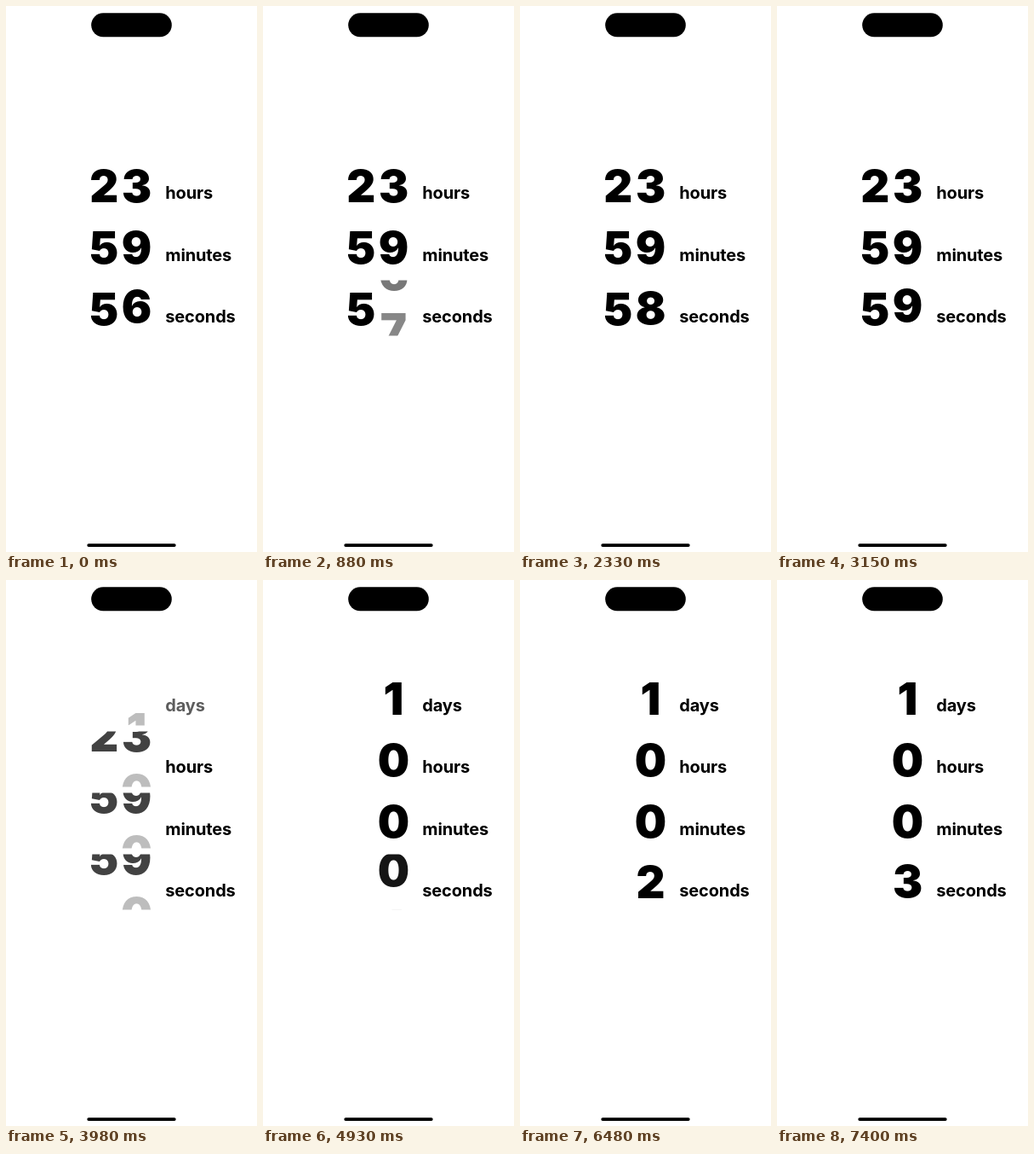
Recreate the animation shown at these times as an HTML page. Size 295x640 px, loop 7.48 s.

```html
<!DOCTYPE html>
<html lang="en">
<head>
<meta charset="utf-8">
<title>Countdown</title>
<style>
  html, body { margin: 0; width: 100%; height: 100%; overflow: hidden; background: #fff; }
  svg { display: block; width: 295px; height: 640px; }
  text { font-family: Inter, Roboto, sans-serif; fill: #000; }
  .digit { font-size: 52.6px; font-weight: 900; text-anchor: middle; }
  .label { font-size: 20px; font-weight: 700; letter-spacing: -0.15px; }
</style>
</head>
<body>
<svg id="stage" viewBox="0 0 295 640">
  <rect width="295" height="640" fill="#fff"/>
  <rect x="100.2" y="8.3" width="94.6" height="28" rx="14"/>
  <rect x="95.3" y="630.2" width="104.4" height="3.8" rx="1.9"/>
</svg>
<script>
const LOOP = 7480;
const ROW = 72, SLIDE = 65;
const TICKS = [-335, 710, 1675, 2775, 3853, 4850, 5838, 6835];
const ROLLOVER = 4; // index of the tick where a full day is reached
const FIRST = 86395; // seconds on the clock before the first tick
const NAMES = ["days", "hours", "minutes", "seconds"];

const stage = document.getElementById("stage");

function add(parent, tag, attrs, text) {
  const el = document.createElementNS("http://www.w3.org/2000/svg", tag);
  for (const key in attrs) el.setAttribute(key, attrs[key]);
  if (text) el.textContent = text;
  parent.appendChild(el);
  return el;
}

// Each row holds a leaving and an entering pair of digits inside a clip box.
const rows = NAMES.map((name, i) => {
  const clip = add(stage, "clipPath", { id: "clip-" + name });
  add(clip, "rect", { x: 90, y: 105.5 + i * ROW, width: 90, height: SLIDE });
  const box = add(stage, "g", { "clip-path": `url(#clip-${name})` });
  const digit = x => add(box, "text", { class: "digit", x, y: 157.6 + i * ROW });
  const pair = () => [digit(115.3), digit(153.5)];
  const label = add(stage, "text", { class: "label", x: 187.3, y: 153.8 + i * 72.5 }, name);
  return { old: pair(), now: pair(), label };
});

// Step response of an underdamped spring
function spring(ms) {
  const t = Math.max(0, ms) / 1000, w = 10, z = 0.66;
  const r = Math.sqrt(1 - z * z), a = w * r * t;
  return 1 - Math.exp(-z * w * t) * (Math.cos(a) + z / r * Math.sin(a));
}

const clamp = v => Math.min(1, Math.max(0, v));

function digits(total) {
  const parts = [Math.floor(total / 86400), Math.floor(total / 3600) % 24,
                 Math.floor(total / 60) % 60, total % 60];
  return parts.map((n, i) => {
    if (i === 0 && n === 0) return ["", ""];
    return [n > 9 ? String(Math.floor(n / 10)) : "", String(n % 10)];
  });
}

function place(el, text, dy, alpha) {
  el.textContent = alpha > 0 ? text : "";
  el.setAttribute("transform", `translate(0 ${dy.toFixed(2)})`);
  el.setAttribute("opacity", alpha.toFixed(3));
}

function draw(t) {
  const k = TICKS.filter(s => s <= t).length - 1;
  const p = spring(t - TICKS[k]);
  const fade = Math.pow(clamp(p), 1.65);
  const before = digits(FIRST + k), after = digits(FIRST + k + 1);
  rows.forEach((row, i) => {
    for (let j = 0; j < 2; j++) {
      const a = before[i][j], b = after[i][j];
      const same = a === b;
      place(row.old[j], a, -p * SLIDE, same || p >= 1 ? 0 : 1 - fade);
      place(row.now[j], b, same ? 0 : (1 - p) * SLIDE, same ? 1 : fade);
    }
  });
  const shown = Math.pow(clamp(spring(t - TICKS[ROLLOVER])), 0.56);
  rows[0].label.setAttribute("opacity", shown.toFixed(3));
}

let start;
function frame(now) {
  if (start === undefined) start = now;
  draw(Math.max(0, now - start) % LOOP);
  requestAnimationFrame(frame);
}
draw(0);
requestAnimationFrame(frame);
</script>
</body>
</html>
```
